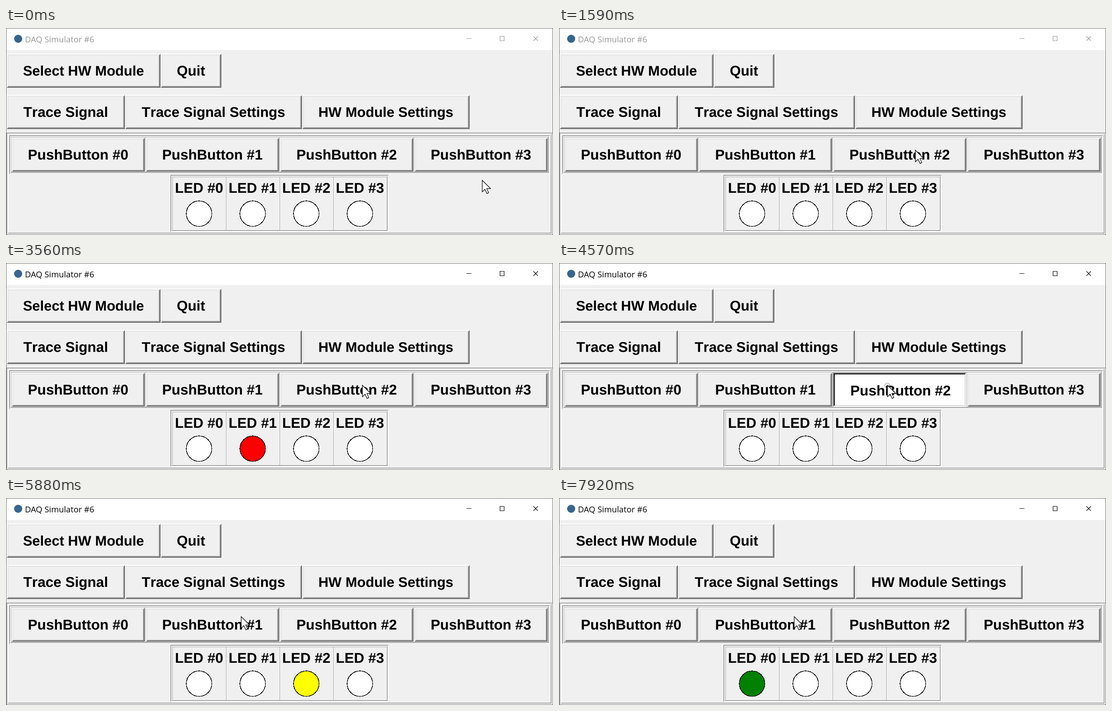
Animation, 1214 px wide and 461 px high, one loop 8 s. Source, as an HTML page:

```html
<!DOCTYPE html>
<html lang="en">
<head>
<meta charset="utf-8">
<title>DAQ Simulator</title>
<style>
  html, body { margin: 0; width: 100%; height: 100%; overflow: hidden; background: #f0f0f0; }
  svg { display: block; width: 1214px; height: 461px; }
  .crisp { shape-rendering: crispEdges; }
  .label {
    font-family: "Liberation Sans", Arial, sans-serif; font-weight: 700; font-kerning: none;
    text-anchor: middle; text-rendering: geometricPrecision;
  }
  .title { font: 18.4px "Open Sans", "Noto Sans", sans-serif; }
</style>
</head>
<body>
<svg id="stage" viewBox="0 0 1214 461"></svg>
<script>
const LOOP = 8000;
const FACE = '#f0f0f0', SHADOW = '#a0a0a0', DARK = '#696969', LIGHT = '#e3e3e3', WHITE = '#fff';

// Bevel layers, outermost first: [thickness, top-left colour, bottom-right colour]
const RAISED = [[2, WHITE, DARK], [2, LIGHT, SHADOW]];
const PRESSED = [[2, '#999', '#e6e6e6'], [2, '#000', LIGHT]];
const GROOVE = [[2, SHADOW, WHITE], [2, WHITE, SHADOW]];
const SUNKEN = [[1, SHADOW, WHITE]];

const stage = document.getElementById('stage');

function add(parent, tag, attrs, text) {
  const node = document.createElementNS('http://www.w3.org/2000/svg', tag);
  for (const key in attrs) node.setAttribute(key, attrs[key]);
  if (text) node.textContent = text;
  return parent.appendChild(node);
}

function rect(parent, x, y, width, height, fill) {
  return add(parent, 'rect', { x, y, width, height, fill, class: 'crisp' });
}

function bevel(parent, x, y, w, h, layers, fill = FACE) {
  for (const [n, topLeft, bottomRight] of layers) {
    rect(parent, x, y, w, h, bottomRight);
    add(parent, 'path', {
      d: `M${x} ${y}h${w}l${-n} ${n}H${x + n}V${y + h - n}l${-n} ${n}z`,
      fill: topLeft, class: 'crisp'
    });
    x += n; y += n; w -= 2 * n; h -= 2 * n;
  }
  rect(parent, x, y, w, h, fill);
}

function label(parent, x, y, size, text) {
  add(parent, 'text', { x, y, 'font-size': size, class: 'label' }, text);
}

function button(x, y, w, text, size, down = false) {
  const group = add(stage, 'g', {});
  const shift = down ? 2 : 0;
  bevel(group, x, y, w, 76, down ? PRESSED : RAISED, down ? WHITE : FACE);
  label(group, x + w / 2 + shift, y + 49 + shift, size, text);
  return group;
}

// Window and title bar
rect(stage, 0, 0, 1214, 461, '#6b6b6b');
rect(stage, 1, 1, 1212, 459, FACE);
rect(stage, 1, 1, 1212, 48, WHITE);
add(stage, 'circle', { cx: 27, cy: 24, r: 9, fill: '#36668f' });
const caption = add(stage, 'g', { fill: 'currentColor' });
add(caption, 'text', { x: 42, y: 32, class: 'title' }, 'DAQ Simulator #6');
add(caption, 'path', {
  d: 'M1022 23.5h11M1096.5 18.5h9v10h-9zM1170.5 18.5l10 10M1180.5 18.5l-10 10',
  fill: 'none', stroke: 'currentColor', 'stroke-width': 1.2
});

// Toolbar
button(1, 57, 342, 'Select HW Module', 31);
button(343, 57, 135, 'Quit', 31.5);
button(1, 149, 263, 'Trace Signal', 31.6);
button(264, 149, 393, 'Trace Signal Settings', 31.3);
button(657, 149, 372, 'HW Module Settings', 31);

// Module panel
bevel(stage, 1, 233, 1212, 227, GROOVE);
bevel(stage, 7, 239, 1200, 86, GROOVE);
bevel(stage, 365, 327, 484, 127, GROOVE);

const pushButtons = [0, 1, 2, 3].map(i => {
  const x = 11 + 298 * i;
  bevel(stage, x, 243, 298, 78, SUNKEN);
  const args = [x + 1, 244, 296, 'PushButton #' + i, 31.6];
  return { up: button(...args), down: button(...args, true) };
});

const leds = [0, 1, 2, 3].map(i => {
  const x = 369 + 119 * i, middle = x + 59.5;
  bevel(stage, x, 331, 119, 119, SUNKEN);
  label(stage, middle, 367, 31.6, 'LED #' + i);
  return add(stage, 'circle', {
    cx: middle, cy: 413.5, r: 28.3, stroke: '#000', 'stroke-width': 1.6, class: 'crisp'
  });
});

const pointer = add(stage, 'g', {});
const ring = add(pointer, 'circle', { cx: .5, cy: 2, r: 5.5, fill: 'none', stroke: '#777' });
add(pointer, 'path', {
  d: 'M1 1.2V26.8L7 21.2l4.4 9.4 3.8-1.7L11 19.7H19.6z',
  fill: WHITE, stroke: '#000', 'stroke-width': 1.2
});

// Timeline: [LED or button, start, end]
const LED_COLOURS = ['#008000', '#f00', '#ff0', '#fff'];
const lit = [
  [2, 500, 1000], [2, 2540, 3040], [1, 3560, 4090],
  [2, 5880, 6350], [1, 6900, 7370], [0, 7920, LOOP]
];
const presses = [[2, 2020, 2220], [2, 4570, 4750], [1, 5270, 5420]];
const FOCUS_AT = 2020;

// Pointer moves: [start, end, steps, x, y]
const moves = [
  [900, 1410, 8, 792, 271],
  [1590, 1590, 1, 790, 271],
  [4170, 4320, 3, 728, 271],
  [4900, 5200, 5, 521, 263]
];

const ease = p => p * p * (3 - 2 * p);
const active = (list, t) => list.find(([, start, end]) => t >= start && t < end);

function pointerAt(t) {
  let x = 1056, y = 338;
  for (const [start, end, steps, toX, toY] of moves) {
    if (t < start) break;
    const gap = (end - start) / (steps - 1) || 1;
    const done = Math.min(steps, Math.floor((t - start) / gap + 1e-6) + 1);
    const p = ease(done / steps);
    x += (toX - x) * p;
    y += (toY - y) * p;
  }
  return [Math.round(x), Math.round(y)];
}

function show(node, on) {
  node.setAttribute('visibility', on ? 'visible' : 'hidden');
}

function draw(t) {
  const on = active(lit, t), press = active(presses, t);
  leds.forEach((led, i) => led.setAttribute('fill', on && on[0] === i ? LED_COLOURS[i] : WHITE));
  pushButtons.forEach(({ up, down }, i) => {
    const held = Boolean(press) && press[0] === i;
    show(up, !held);
    show(down, held);
  });
  show(ring, press);
  caption.setAttribute('color', t < FOCUS_AT ? '#999' : '#000');
  pointer.setAttribute('transform', `translate(${pointerAt(t)})`);
}

const begin = performance.now();
function tick() {
  draw((performance.now() - begin) % LOOP);
  requestAnimationFrame(tick);
}
tick();
</script>
</body>
</html>
```
